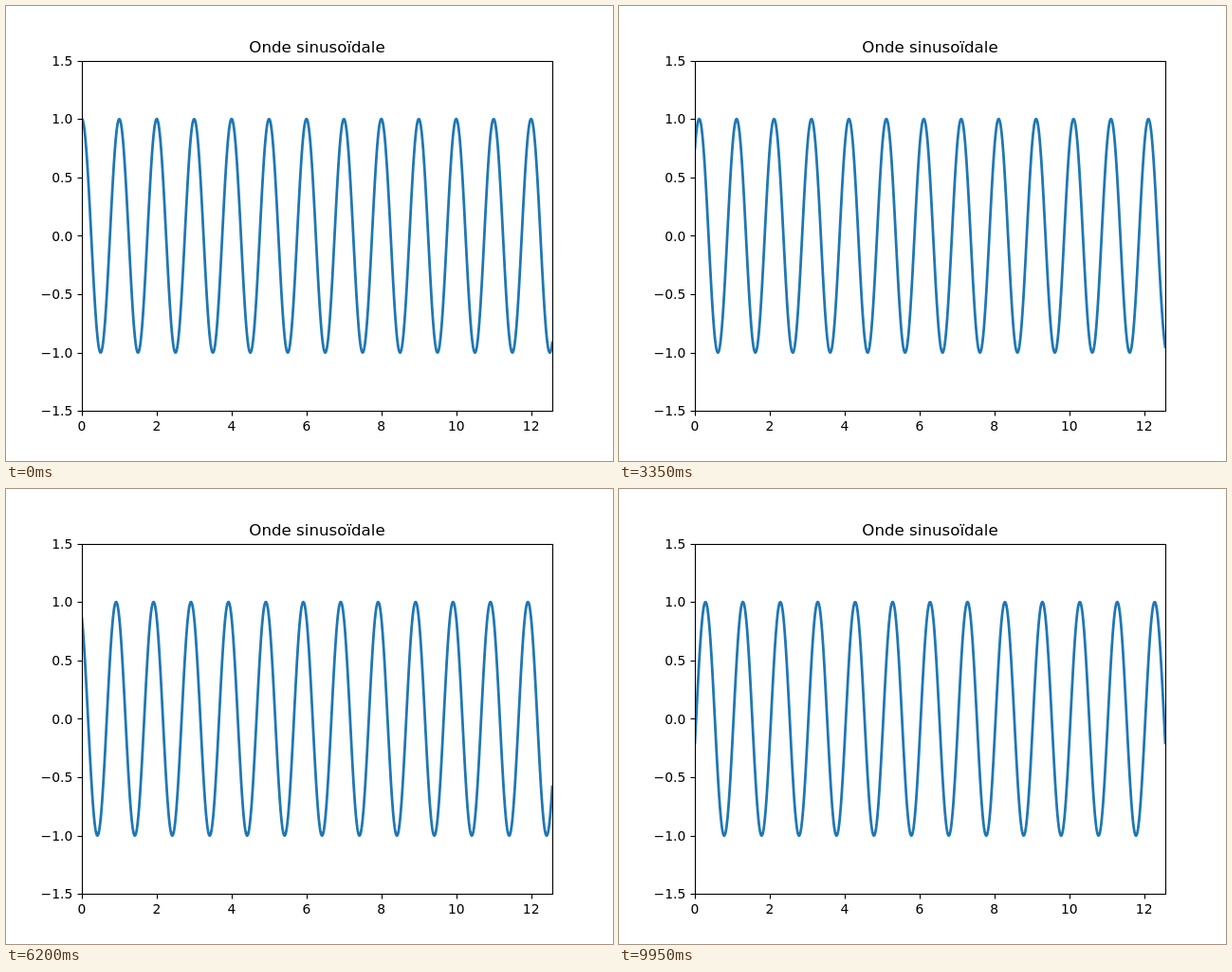
Animation, 640 px wide and 480 px high, one loop 10000 ms. Source, as an HTML page with a canvas:

```html
<!DOCTYPE html>
<html lang="fr">
<head>
<meta charset="utf-8">
<title>Onde sinusoïdale</title>
<style>
  html, body { margin: 0; overflow: hidden; background: #fff; }
  canvas { display: block; }
</style>
</head>
<body>
<canvas width="640" height="480"></canvas>
<script>
const ctx = document.querySelector('canvas').getContext('2d');
const LEFT = 80, RIGHT = 576, TOP = 57.6, BOTTOM = 427.2;
const X_MAX = 4 * Math.PI, POINTS = 1000;
const STEP_MS = 50, STEPS = 200;

const px = x => LEFT + x / X_MAX * (RIGHT - LEFT);
const py = y => (TOP + BOTTOM) / 2 - y / 3 * (BOTTOM - TOP);
const snap = v => Math.round(v) + 0.5;

function line(x1, y1, x2, y2) {
  ctx.beginPath();
  ctx.moveTo(x1, y1);
  ctx.lineTo(x2, y2);
  ctx.stroke();
}

function text(string, x, y, size, align) {
  ctx.font = `${size}px "DejaVu Sans", sans-serif`;
  ctx.textAlign = align;
  ctx.fillText(string, x, y);
}

function drawWave(shift) {
  ctx.save();
  ctx.beginPath();
  ctx.rect(LEFT, TOP, RIGHT - LEFT, BOTTOM - TOP);
  ctx.clip();
  ctx.beginPath();
  for (let i = 0; i < POINTS; i++) {
    const x = X_MAX * i / (POINTS - 1);
    ctx.lineTo(px(x), py(Math.cos(2 * Math.PI * (x - shift))));
  }
  ctx.strokeStyle = '#1f77b4';
  ctx.lineWidth = 2.78;
  ctx.lineJoin = 'round';
  ctx.lineCap = 'square';
  ctx.stroke();
  ctx.restore();
}

function drawAxes() {
  ctx.strokeStyle = ctx.fillStyle = '#000';
  ctx.lineWidth = 1.11;
  const left = snap(LEFT), top = snap(TOP), bottom = snap(BOTTOM);
  ctx.strokeRect(left, top, snap(RIGHT) - left, bottom - top);
  for (let x = 0; x <= 12; x += 2) {
    line(snap(px(x)), bottom, snap(px(x)), bottom + 5);
    text(x, px(x), 448, 13.89, 'center');
  }
  for (let y = -1.5; y <= 1.5; y += 0.5) {
    line(left - 5, snap(py(y)), left, snap(py(y)));
    text(y.toFixed(1).replace('-', '\u2212'), 70.28, Math.round(py(y) + 5.28), 13.89, 'right');
  }
  text('Onde sinusoïdale', 328, 49, 16.67, 'center');
}

function draw() {
  const step = Math.floor(performance.now() / STEP_MS) % STEPS;
  ctx.fillStyle = '#fff';
  ctx.fillRect(0, 0, 640, 480);
  drawWave(2 * Math.PI * step / (STEPS - 1));
  drawAxes();
  requestAnimationFrame(draw);
}
draw();
</script>
</body>
</html>
```
